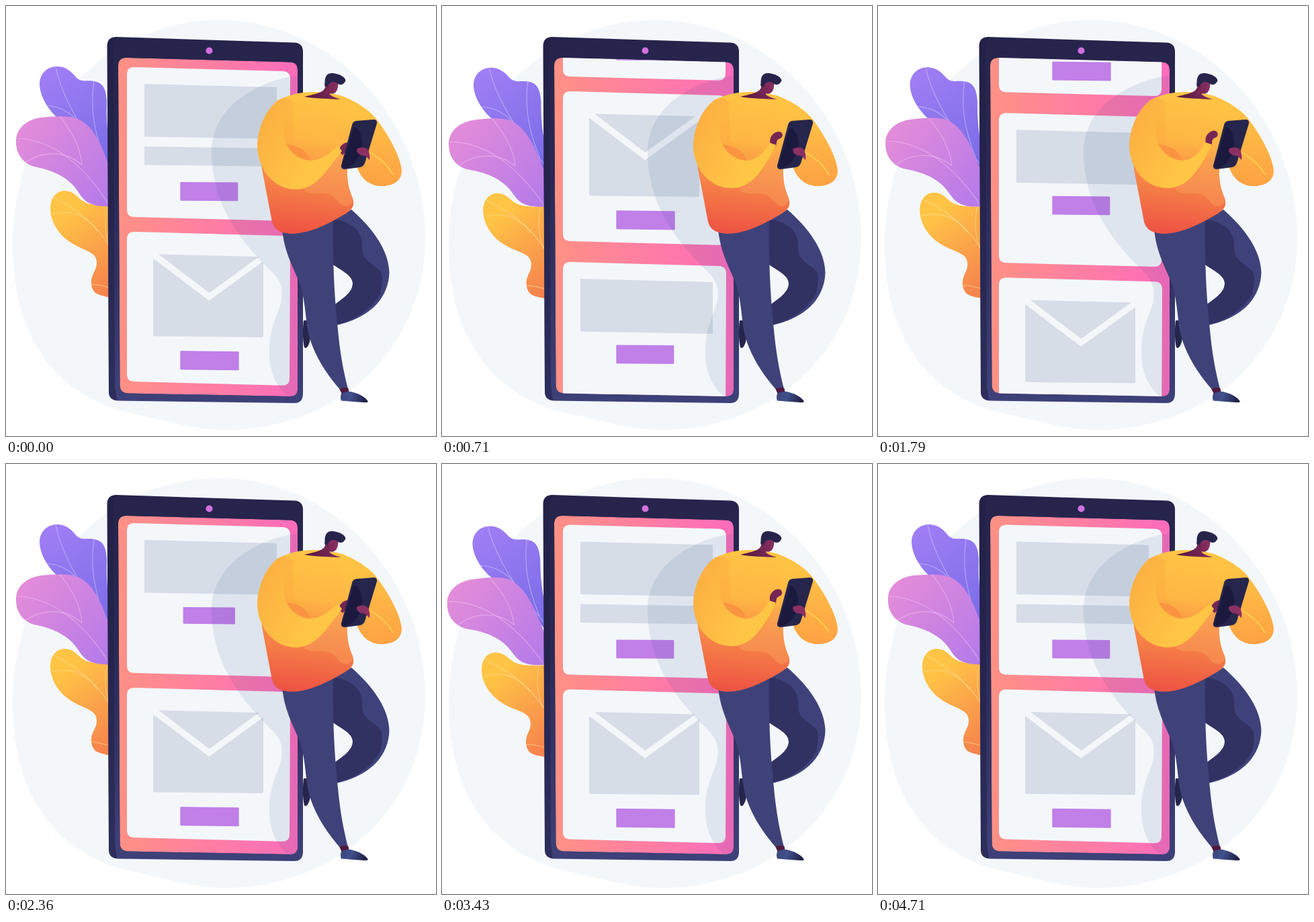
Animation, 640 px wide and 640 px high, one loop 4780 ms. Source, as an HTML page:

```html
<!DOCTYPE html>
<html lang="en">
<head>
<meta charset="utf-8">
<title>Scrolling mail feed</title>
<style>
html, body { margin: 0; width: 100%; height: 100%; overflow: hidden; background: #fff; }
svg { display: block; width: 100%; height: 100%; }
.vein { fill: none; stroke-width: 1.1; stroke-linecap: round; stroke-opacity: .6; }
</style>
</head>
<body>
<svg viewBox="0 0 640 640" xmlns="http://www.w3.org/2000/svg">
<defs>
  <linearGradient id="violet" gradientUnits="userSpaceOnUse" x1="60" y1="95" x2="150" y2="230">
    <stop offset="0" stop-color="#a07ef4"/><stop offset="1" stop-color="#7a6de8"/>
  </linearGradient>
  <linearGradient id="pink" gradientUnits="userSpaceOnUse" x1="25" y1="180" x2="150" y2="285">
    <stop offset="0" stop-color="#e38cd9"/><stop offset="1" stop-color="#b67be9"/>
  </linearGradient>
  <linearGradient id="amber" gradientUnits="userSpaceOnUse" x1="85" y1="310" x2="160" y2="415">
    <stop offset="0" stop-color="#ffc445"/><stop offset="1" stop-color="#f6844e"/>
  </linearGradient>
  <linearGradient id="case" gradientUnits="userSpaceOnUse" x1="0" y1="50" x2="0" y2="590">
    <stop offset="0" stop-color="#26244b"/><stop offset=".4" stop-color="#2a2955"/><stop offset="1" stop-color="#3e4179"/>
  </linearGradient>
  <linearGradient id="screen" gradientUnits="userSpaceOnUse" x1="168" y1="0" x2="434" y2="0">
    <stop offset="0" stop-color="#ff9184"/><stop offset=".4" stop-color="#ff829d"/><stop offset="1" stop-color="#fc6cbc"/>
  </linearGradient>
  <linearGradient id="body" gradientUnits="userSpaceOnUse" x1="470" y1="130" x2="450" y2="338">
    <stop offset="0" stop-color="#ffc545"/><stop offset=".35" stop-color="#feb544"/>
    <stop offset=".6" stop-color="#f78a48"/><stop offset="1" stop-color="#ee5443"/>
  </linearGradient>
  <linearGradient id="sleeve" gradientUnits="userSpaceOnUse" x1="375" y1="190" x2="455" y2="230">
    <stop offset="0" stop-color="#fcb142"/><stop offset="1" stop-color="#ffc545"/>
  </linearGradient>
  <linearGradient id="arm" gradientUnits="userSpaceOnUse" x1="535" y1="155" x2="545" y2="275">
    <stop offset="0" stop-color="#ffc344"/><stop offset="1" stop-color="#fda044"/>
  </linearGradient>
  <linearGradient id="skin" gradientUnits="userSpaceOnUse" x1="450" y1="138" x2="494" y2="115">
    <stop offset="0" stop-color="#54183f"/><stop offset="1" stop-color="#8b3062"/>
  </linearGradient>
  <linearGradient id="shoe" gradientUnits="userSpaceOnUse" x1="498" y1="575" x2="536" y2="590">
    <stop offset="0" stop-color="#3a4379"/><stop offset=".4" stop-color="#41518c"/><stop offset="1" stop-color="#1e1c42"/>
  </linearGradient>
  <path id="glass" d="M179 77L423 83.5Q434 84 434 95V570Q434 581 423 581L182 576.5Q170 576 169.5 565L167 89Q167 77 179 77Z"/>
  <clipPath id="clip"><use href="#glass"/></clipPath>

  <path id="card" fill="#f3f7fa" d="M191 0L412 6Q423 6.5 423 17.5L422 218Q422 229 411 228.7L191 223Q180 223 180 212V11Q180 0 191 0Z"/>
  <path id="photo" fill="#d7dde7" d="M206 25L403 30V107L206 103.5Z"/>
  <path id="bar" fill="#d7dde7" d="M206 118L403 121V148L206 145.5Z"/>
  <path id="btn" fill="#c17fe8" d="M260.500 0L344 .6Q345.300 .6 345.300 2V27Q345.300 28.300 344 28.300L260.500 27.700Q259.300 27.700 259.300 26.500V1.300Q259.300 0 260.500 0Z"/>
  <g id="mail">
    <use href="#card"/>
    <path fill="#d7dde7" d="M227 33.500L377 37L302.500 91Z"/>
    <path fill="#d7dde7" d="M219 39.500L302 102.500L383 44V155Q383 157 381 157L222 155.500Q219 155.500 219 153Z"/>
    <path fill="#c17fe8" d="M260.500 177.300L345.500 178.300Q346.700 178.300 346.700 179.600V205Q346.700 206.200 345.500 206.200L260.500 205.200Q259.300 205.200 259.300 204V178.500Q259.300 177.300 260.500 177.300Z"/>
  </g>
</defs>

<path fill="#f3f7fa" d="M10 355C10 165 148 21 317 21C486 21 624 168 624 345C624 515 490 631 325 631C275 630 235 616 190 607C110 590 10 530 10 355Z"/>

<g id="leafA">
  <path fill="url(#violet)" d="M170 270C140 225 110 188 76 166C61 152 50 133 50 115C51 98 64 89 78 90C92 91 99 100 105 107C113 114 120 110 131 112C145 114 149 124 150 142C149 168 151 190 156 215Z"/>
  <g class="vein" stroke="#d5caff">
    <path d="M74 91C81 125 102 172 153 236"/><path d="M60 148Q92 150 112 178"/><path d="M131 112C126 145 128 178 146 226"/>
  </g>
</g>
<g id="leafC">
  <path fill="url(#amber)" d="M66 302C66 285 75 275 88 275C102 276 106 285 114 290C124 297 140 297 175 298V438C150 433 138 431 132 426C125 418 126 406 130 398C136 388 137 378 131 371C121 362 106 360 92 349C76 337 66 319 66 302Z"/>
  <g class="vein" stroke="#ffe39c">
    <path d="M72 285C105 302 138 328 155 360"/><path d="M70 309C95 303 118 311 136 335"/>
    <path d="M151 299C146 322 147 340 155 360"/><path d="M127 414Q140 414 158 421"/>
  </g>
</g>
<g id="leafB">
  <path fill="url(#pink)" d="M15 203C14 183 30 169 52 166C75 164 92 163 107 168C130 179 141 203 154 240L170 299C150 298 138 299 128 295C111 289 110 276 97 264C82 250 65 244 42 239C25 234 15 220 15 203Z"/>
  <g class="vein" stroke="#f3bff0">
    <path d="M15 197C70 198 118 238 156 300"/><path d="M29 233C50 217 86 213 112 236"/><path d="M81 165C95 184 110 205 113 236"/>
  </g>
</g>

<path fill="url(#case)" d="M164 46L429 54.500Q442 55 442 68V577Q442 591 429 591L167 587.500Q153 587 153 574L150.500 60Q150.500 46 164 46Z"/>
<path fill="#211f45" fill-opacity=".55" d="M164 47Q151 47 151 60L153 574Q153 586 165 587L162 566L160 70Q160 50 164 47Z"/>
<circle cx="302.500" cy="66.500" r="5" fill="#d470de"/>
<g clip-path="url(#clip)">
  <use href="#glass" fill="url(#screen)"/>
  <g id="feed">
    <g transform="translate(0 91)">
      <use href="#card"/><use href="#photo"/><use href="#bar"/><use href="#btn" y="171"/>
    </g>
    <use href="#mail" y="336"/>
    <g transform="translate(0 590)">
      <use href="#card"/><use href="#photo"/><use id="newBar" href="#bar"/><use id="press" href="#btn"/>
    </g>
    <use href="#mail" y="835"/>
  </g>
  <path fill="#2b4382" fill-opacity=".1" d="M440 102C365 112 306 155 306 217C306 300 354 355 396 396C411 411 413 425 409 443C403 463 392 480 392 515C392 545 402 568 424 585H450V102Z"/>
</g>

<path fill="#26254c" d="M443 468C441 485 442 500 444 508Q448 512 452 500L458 468Z"/>
<path fill="#3f427a" d="M480 320L514 303C546 331 570 364 570.500 397C569 441 533 468 486 476L450 478L486 447C503 434 516 426 516 413C516 401 500 394 484 383Z"/>
<path fill="#313162" d="M484 317L497 319C523 327 531 342 530 358C529 381 549 383 558 396C562 406 559 418 557 428C543 452 520 468 486 476L450 478L486 447C503 434 516 426 516 413C516 401 500 394 484 383Z"/>
<path fill="#3f4279" d="M411 332L487 320C486 385 489 435 494 482C498 525 504 550 509 570L498 572C472 542 453 510 448 476C445 452 444 433 437 412C426 386 414 365 411 332Z"/>
<path fill="#4f1a40" d="M496.500 570Q503 566 509.500 569L511 577L500 578Z"/>
<path fill="url(#shoe)" d="M499 577C506 573 511 573 517 575C528 578 536 583 539 589Q538 590 533 590L499 587.500Q497 583 499 577Z"/>

<path fill="url(#body)" d="M404 141C430 126 465 125 497 133C535 146 550 170 535 210L508 240C507 262 511 274 516 286C519 297 516 302 507 308C480 325 450 339 425 339C405 338 397 331 395 316L381 243L376 200Z"/>
<path fill="#f9a15c" fill-opacity=".45" d="M441 271C449 284 470 276 483 281C494 288 497 298 506 298Q517 296 516 287C511 274 507 262 508 238L497 215C485 240 465 265 441 271Z"/>
<path fill="url(#arm)" d="M497 133C522 142 542 155 554 172C572 196 588 227 589 246C588 263 573 269 555 268C538 266 527 254 522 239L510 215Z"/>
<path fill="none" stroke="#ffd250" stroke-width="1.800" stroke-linecap="round" d="M541 218C554 225 567 235 576 251"/>
<path fill="#fbab42" fill-opacity=".45" d="M426 148C413 162 409 186 416 203C425 222 440 230 454 230L430 200Z"/>
<path id="hand" fill="#762654" d="M-2 0C-5 -8 -2 -17 7 -20C13 -22 16 -17 15 -14C14 -9 9 -11 7 -6L6 2Z"/>
<path id="forearm" fill="url(#sleeve)"/>
<path fill="#fb9440" d="M418 206C426 221 438 229 453 230C449 216 438 209 418 206Z"/>

<path fill="#26254c" d="M521 171L547 169Q553 169 552 175L534 234Q532 239 527 240L504 243Q498 243 499 237L515 177Q516 172 521 171Z"/>
<path fill="#1b1a3e" d="M518 180C526 183 531 195 530 207C529 224 520 236 507 241Q500 242 501 236Z"/>
<path fill="#8c3064" d="M522 213C529 209 537 210 540 216Q542 223 541 229C538 227 537 223 533 223C527 222 522 220 522 213Z"/>

<path fill="url(#skin)" d="M476 112L494 110C495 117 494 124 491 128Q487 132 482 130Q480 133 498 139C480 138 460 138 444 135C460 131 473 129 475 121Z"/>
<path fill="#6a2350" d="M474 116Q478 113 480 118L479 123Q474 122 474 116Z"/>
<path fill="#27244c" d="M475 119C473 105 478 99 486 100C497 101 505 106 505.500 111C503 117 498 119 493 115C487 111 481 113 479 120Z"/>
</svg>
<script>
const LOOP = 4780, HALF = LOOP / 2, BEAT = LOOP / 4;
const $ = id => document.getElementById(id);
const lerp = (a, b, u) => a + (b - a) * u;
const span = (t, a, b) => Math.min(1, Math.max(0, (t - a) / (b - a)));
const smooth = u => u * u * (3 - 2 * u);
const wave = (t, period) => (1 - Math.cos(2 * Math.PI * t / period)) / 2;
const move = (el, value) => $(el).setAttribute('transform', value);

// Cubic ease with flat ends; k is the reach of both handles.
function glide(x, k = 0.28) {
  let lo = 0, hi = 1;
  for (let i = 0; i < 24; i++) {
    const s = (lo + hi) / 2, r = 1 - s;
    if (3 * r * r * s * k + 3 * r * s * s * k + s * s * s < x) lo = s; else hi = s;
  }
  return smooth(lo);
}

function scrollAt(t) {
  return 244 * glide(span(t, 0, BEAT))
    + 258.5 * glide(span(t, 1230, 2425))
    - 3 * smooth(span(t, 2425, 2860));
}

function sway(t) {
  const s = wave(t, HALF);
  move('leafA', `rotate(${-2 * s} 150 255)`);
  move('leafB', `rotate(${-3 * s} 165 350)`);
  move('leafC', `rotate(${-2.85 * s} 200 452)`);
}

function reach(t) {
  // two quick flicks, then one slow one
  const u = t < HALF ? wave(t, BEAT) : wave(t - HALF, HALF);
  const mix = (a, b) => lerp(a, b, u).toFixed(2);
  move('hand', `translate(${mix(497, 490.5)} ${mix(217.5, 206)}) rotate(${mix(28, 0)})`);
  const low = mix(273, 271);
  $('forearm').setAttribute('d',
    `M405 140C385 156 374 184 374 210C375 241 397 ${low} 431 ${low}` +
    `C463 ${low} 479 242 ${mix(500, 497)} ${mix(216, 206)}` +
    `L${mix(494, 487)} ${mix(208, 203)}` +
    `C${mix(481, 480)} ${mix(220, 217)} 468 230 452 230` +
    `C430 228 411 209 413 184C414 166 421 154 430 146C424 138 414 136 405 140Z`);
}

function feed(t) {
  move('feed', `translate(0 ${-scrollAt(t)})`);
  const open = smooth(span(t, 2500, 2900));
  const k = 1 - 0.1 * Math.sin(Math.PI * span(t, 2230, 2490));
  move('press', `translate(302.3 ${lerp(137.5, 185, open)}) scale(${k}) translate(-302.3 -14)`);
  $('newBar').setAttribute('opacity', smooth(span(t, 2620, 2900)));
}

function draw(now) {
  const t = now % LOOP;
  sway(t);
  reach(t);
  feed(t);
}

let start = null;
function tick(now) {
  if (start === null) start = now;
  draw(now - start);
  requestAnimationFrame(tick);
}
draw(0);
requestAnimationFrame(tick);
</script>
</body>
</html>
```
